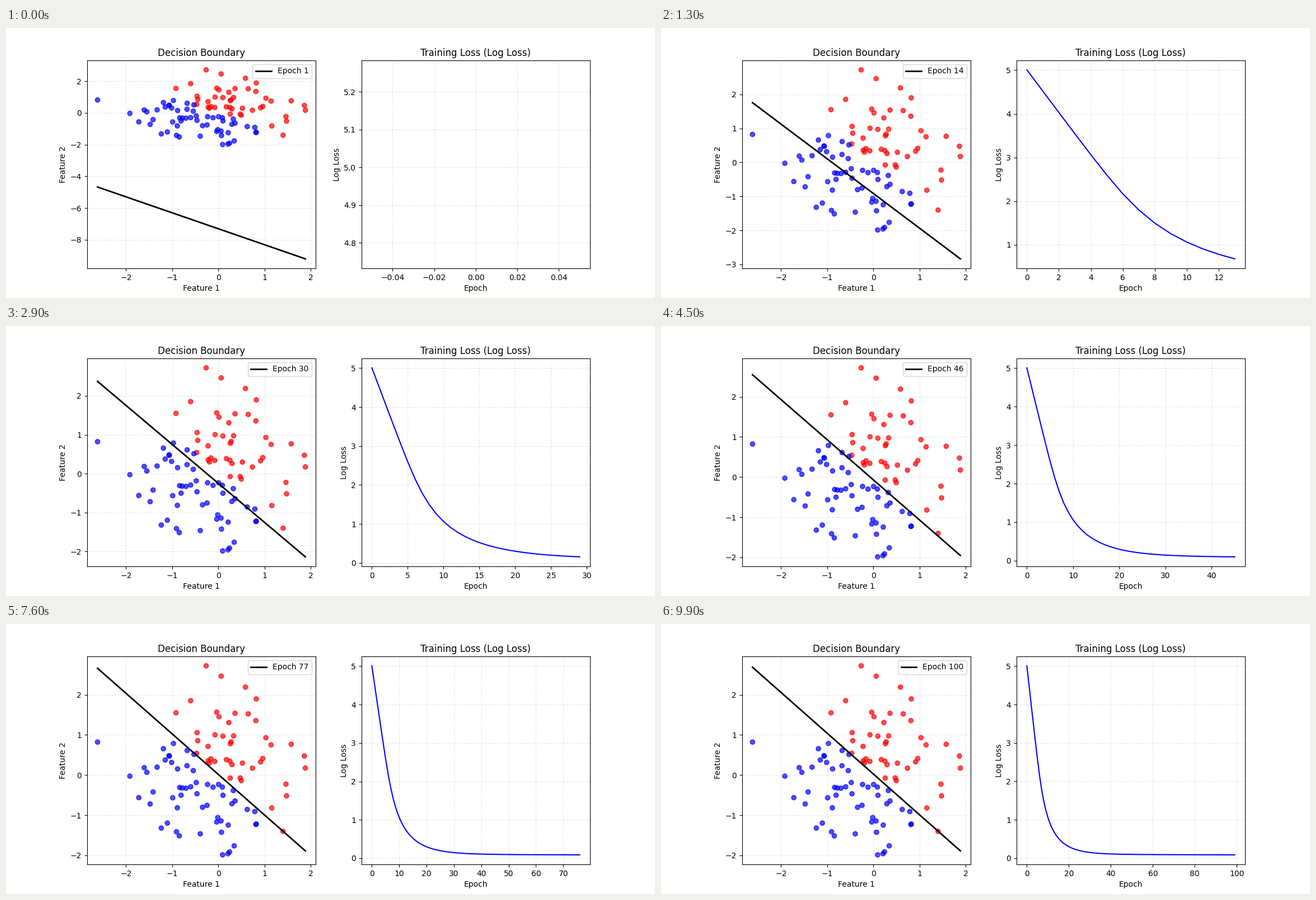
Write a matplotlib script that moves like this. It is 1159 px wide and 483 px high and loops after 10 s.

```python
import numpy as np
import matplotlib.pyplot as plt
from matplotlib.animation import FuncAnimation

EPOCHS = 100
RATE = 1.0

rng = np.random.RandomState(42)
X = rng.randn(100, 2)
y = (X.sum(axis=1) > 0).astype(float)


def train():
    """Logistic regression by gradient descent from a badly placed start."""
    w, b = np.ones(2), 10.0
    bounds, losses = [], []
    xs = np.array([X[:, 0].min(), X[:, 0].max()])
    for _ in range(EPOCHS):
        p = 1 / (1 + np.exp(-(X @ w + b)))
        q = np.clip(p, 1e-15, 1 - 1e-15)
        losses.append(-np.mean(y * np.log(q) + (1 - y) * np.log(1 - q)))
        w = w - RATE * X.T @ (p - y) / len(y)
        b = b - RATE * np.mean(p - y)
        bounds.append(-(w[0] * xs + b) / w[1])
    return xs, bounds, losses


xs, bounds, losses = train()

plt.rcParams["font.family"] = "DejaVu Sans"
fig, (ax_data, ax_loss) = plt.subplots(1, 2, figsize=(11.59, 4.83), dpi=100)


def style(ax, title, xlabel, ylabel):
    ax.set_title(title)
    ax.set_xlabel(xlabel)
    ax.set_ylabel(ylabel)
    ax.grid(True, linestyle="--", alpha=0.3)


style(ax_data, "Decision Boundary", "Feature 1", "Feature 2")
style(ax_loss, "Training Loss (Log Loss)", "Epoch", "Log Loss")

ax_data.scatter(X[:, 0], X[:, 1], c=y, cmap="bwr", alpha=0.7)
boundary, = ax_data.plot(xs, bounds[0], "k-", linewidth=2, label="Epoch 1")
legend = ax_data.legend(loc="upper right")
curve, = ax_loss.plot([], [], "b-")


def update(i):
    boundary.set_ydata(bounds[i])
    legend.get_texts()[0].set_text(f"Epoch {i + 1}")
    lo = min(X[:, 1].min(), bounds[i].min())
    hi = max(X[:, 1].max(), bounds[i].max())
    pad = 0.05 * (hi - lo)
    ax_data.set_ylim(lo - pad, hi + pad)

    curve.set_data(np.arange(i + 1), losses[:i + 1])
    ax_loss.relim()
    ax_loss.autoscale_view()
    return boundary, curve


anim = FuncAnimation(fig, update, frames=EPOCHS, interval=100, repeat=True)
plt.show()
```
